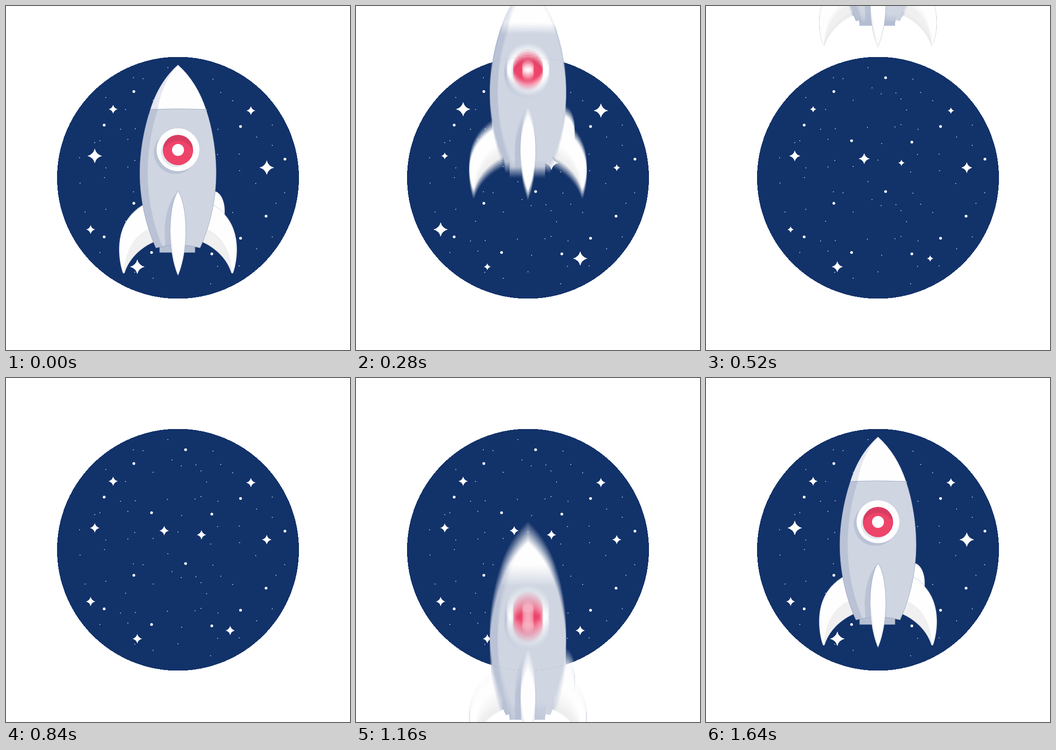
Recreate the animation shown at these times as an HTML page. Size 748x748 px, loop 1680 ms.

```html
<!DOCTYPE html>
<html lang="en">
<head>
<meta charset="utf-8">
<title>Rocket launch</title>
<style>
  html, body { margin: 0; width: 100%; height: 100%; overflow: hidden; background: #fff; }
  svg { display: block; width: 100vw; height: 100vh; }
  .line { stroke: #8996b6; stroke-width: .7; }
</style>
</head>
<body>
<svg viewBox="0 0 748 748">
  <defs>
    <clipPath id="inside"><circle cx="374" cy="373.5" r="263"/></clipPath>
    <clipPath id="outside">
      <path clip-rule="evenodd" d="M0 0H748V748H0ZM111 373.5a263 263 0 1 0 526 0a263 263 0 1 0-526 0Z"/>
    </clipPath>
    <clipPath id="hull">
      <path d="M374 128C346 153 326 186 314 225C299 270 291 320 291 362C291 425 306 482 326 526Q374 513 422 526C442 482 457 425 457 362C457 320 450 270 435 225C422 186 402 153 374 128Z"/>
    </clipPath>
    <clipPath id="pane"><circle cx="374" cy="313" r="33"/></clipPath>
    <path id="spark" d="M0-1Q.2-.2 1 0Q.2 .2 0 1Q-.2 .2-1 0Q-.2-.2 0-1Z"/>

    <g id="fin">
      <path fill="#fefefe" d="M304 429C262 452 246 488 246 530C246 550 250 568 254 580Q256 583 258 580C266 553 290 526 326 511Z"/>
      <path fill="#f0f0f0" d="M256 581C259 534 276 500 312 484L326 511C290 526 266 553 258 580Z"/>
      <path class="line" fill="none" stroke-opacity=".7" d="M298 432C262 452 246 488 246 530C246 550 250 568 254 580Q256 583 258 580C266 553 290 526 321 513"/>
    </g>

    <g id="rocket">
      <path class="line" fill="#fefefe" d="M455 403C469 407 478 430 475 456L448 436Z"/>
      <use href="#fin"/>
      <use href="#fin" transform="translate(748 0) scale(-1 1)"/>
      <path class="line" fill="#b6c0d3" d="M334 516H411V536H334Z"/>
      <g clip-path="url(#hull)">
        <path fill="#cfd5e1" d="M280 120H470V540H280Z"/>
        <path fill="#bac2d5" d="M280 220H332C316 265 308 315 308 362C308 425 322 480 343 530H280Z"/>
        <path fill="#fefefe" d="M300 120H450V225Q374 222 300 225Z"/>
        <path fill="#e6e8f0" d="M374 128C350 155 336 188 330 224L300 225V120H374Z"/>
        <path class="line" fill="none" d="M314 225Q374 222 436 225"/>
        <path fill="#bac2d5" d="M374 403C353 425 346 455 345 490L347 530H374Z"/>
      </g>
      <path class="line" fill="none" d="M374 128C346 153 326 186 314 225C299 270 291 320 291 362C291 425 306 482 326 526Q374 513 422 526C442 482 457 425 457 362C457 320 450 270 435 225C422 186 402 153 374 128Z"/>
      <circle cx="368" cy="318.5" r="46.5" fill="#bac2d5"/>
      <circle cx="374" cy="312.5" r="46.5" fill="#fefefe"/>
      <circle cx="370" cy="317" r="33" fill="#e4e7ef"/>
      <g clip-path="url(#pane)">
        <circle cx="374" cy="313" r="33" fill="#d93c62"/>
        <circle cx="374" cy="328" r="35" fill="#ef446a"/>
      </g>
      <circle cx="374" cy="313" r="13" fill="#fff"/>
      <path class="line" fill="#fefefe" d="M374 403C362 420 357 455 357 490C357 530 365 565 374 586C383 565 391 530 391 490C391 455 386 420 374 403Z"/>
      <path fill="#f0f0f0" d="M357.5 482C361 520 366 555 374 585C365 565 357.5 530 357.5 482Z"/>
    </g>

    <filter id="blur" filterUnits="userSpaceOnUse" x="235" y="-60" width="278" height="868" color-interpolation-filters="sRGB"></filter>
    <filter id="cut" filterUnits="userSpaceOnUse" x="235" y="-60" width="278" height="868" color-interpolation-filters="sRGB"></filter>
  </defs>

  <circle cx="374" cy="373.5" r="263" fill="#12326a" shape-rendering="crispEdges"/>
  <g id="dots" fill="#fff"></g>
  <g id="sparks" fill="#fff"></g>
  <g clip-path="url(#outside)"><g filter="url(#cut)"><use class="ship" href="#rocket"/></g></g>
  <g clip-path="url(#inside)"><g filter="url(#blur)"><use class="ship" href="#rocket"/></g></g>
</svg>
<script>
const LOOP = 1680, STEP = 40, STAGES = 5;
const $ = id => document.getElementById(id);
const clamp = (v, a, b) => Math.min(b, Math.max(a, v));

// Star field: most dots repeat once, lower down.
const near = [352,134, 277,156, 298,158, 450,159];
const pairs = [361,178, 381,191, 413,189, 467,188, 424,202, 493,206, 320,205, 436,226,
  260,225, 217,199, 249,268, 281,267, 351,264, 411,263, 424,258, 461,268, 579,259,
  545,285, 265,290, 204,293, 382,299, 460,323, 507,322, 280,336, 374,335, 320,349, 445,361];
const single = [193,297, 579,303, 160,330, 217,352, 265,350, 508,358, 214,373,
  161,385, 543,386, 606,406, 587,429, 172,448];
const bigPairs = [278,186, 213.5,259, 510,262, 316.5,293, 447.5,296];
const bigSingle = [390.5,156, 390.5,403.5, 606.5,333, 565.5,457];

function dots(list, r, dy) {
  let out = '';
  for (let i = 0; i < list.length; i += 2) {
    const dot = y => `<circle cx="${list[i]}" cy="${y}" r="${r}" fill-opacity="${r > 2 ? 1 : .8}"/>`;
    out += dot(list[i + 1]) + (dy ? dot(list[i + 1] + dy) : '');
  }
  return out;
}
$('dots').innerHTML = dots(near, 1.1, 248) + dots(pairs, 1.1, 243) + dots(single, 1.1)
  + dots(bigPairs, 3, 243) + dots(bigSingle, 3);

// Two groups of sparkles, each with [time, radius] keys.
const groups = [
  { at: [[233,224.5], [425,341], [532.5,227.5], [184,486], [487.5,549]],
    keys: [[0,9.8], [320,16], [570,6], [670,6], [1000,14], [1330,6], [1640,9.8]] },
  { at: [[193,326], [344,332], [567,351.5], [285.5,567]],
    keys: [[0,16], [380,6], [640,16.8], [1000,6], [1360,15.6], [1640,16]] }
];
const sparks = groups.flatMap(g => g.at.map(([x, y]) => {
  const el = document.createElementNS('http://www.w3.org/2000/svg', 'use');
  el.setAttribute('href', '#spark');
  $('sparks').append(el);
  return { el, x, y, keys: g.keys };
}));

function radius(keys, t) {
  const i = Math.max(1, keys.findIndex(k => k[0] >= t));
  const [t0, a] = keys[i - 1], [t1, b] = keys[i];
  return a + (b - a) * (1 - Math.cos(Math.PI * (t - t0) / (t1 - t0))) / 2;
}

// Vertical motion blur: each stage averages two shifted copies at half the distance.
function stages() {
  let out = '', src = 'SourceGraphic';
  for (let i = 0; i < STAGES; i++) {
    const k = 2 ** -(i + 2);
    out += `<feOffset in="${src}" data-k="${k}" result="a${i}"/>`
      + `<feOffset in="${src}" data-k="${-k}" result="b${i}"/>`
      + `<feComposite in="a${i}" in2="b${i}" operator="arithmetic" k1="0" k2=".5" k3=".5" k4="0" result="s${i}"/>`;
    src = 's' + i;
  }
  return out;
}
$('blur').innerHTML = stages();
$('cut').innerHTML = stages()
  + '<feComponentTransfer><feFuncA type="discrete" tableValues="0 1"/></feComponentTransfer>';
const offsets = [...document.querySelectorAll('feOffset')];
const ships = [...document.querySelectorAll('.ship')];

// Leaves through the top, comes back from below.
function shipY(t) {
  if (t < 360) return -288 * (Math.max(0, t) / 360) ** 2;
  if (t < 820) return -616 + 328 * (Math.max(0, 770 - t) / 410) ** 2;
  const x = clamp((t - 840) / 568, 0, 1);
  return 620 * (x < .5 ? 1 - 4 * x ** 3 : 4 * (1 - x) ** 3);
}

function draw(t) {
  const len = Math.abs(shipY(t + 10) - shipY(t - 10));
  for (const s of ships) s.setAttribute('transform', `translate(0 ${shipY(t)})`);
  for (const o of offsets) o.setAttribute('dy', len < 1 ? 0 : len * o.dataset.k);
  for (const s of sparks)
    s.el.setAttribute('transform', `translate(${s.x} ${s.y}) scale(${radius(s.keys, t)})`);
}

const start = performance.now();
function tick() {
  const t = (performance.now() - start) % LOOP;
  draw(Math.floor(t / STEP) * STEP);
  requestAnimationFrame(tick);
}
tick();
</script>
</body>
</html>
```
